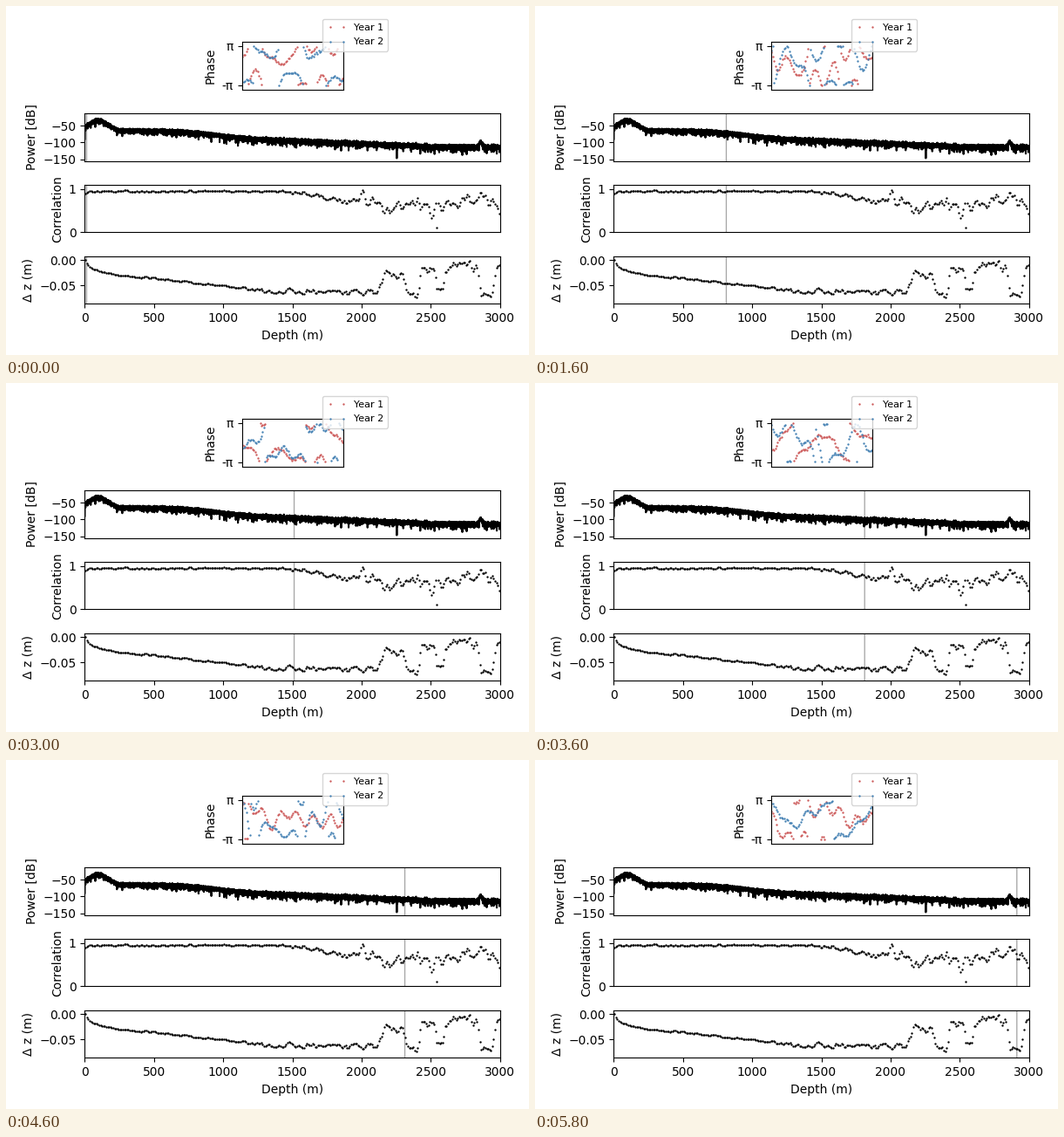
Recreate the animation shown at these times as a matplotlib script. Size 600 by 400 pixels, loop 6000 ms.

```python
import numpy as np
import matplotlib.pyplot as plt
from matplotlib.animation import FuncAnimation

W, H, FRAMES = 600, 400, 30
TOP, PITCH, ROW = 41.05, 81.9, 54.6
rng = np.random.default_rng(12)
plt.rcParams.update({"font.family": "DejaVu Sans", "font.size": 10})
fig = plt.figure(figsize=(W / 100, H / 100), dpi=100, facecolor="white")


def panel(row, x, w, label, xlim, ylim, ticks):
    bottom = H - TOP - row * PITCH - ROW
    ax = fig.add_axes([x / W, bottom / H, w / W, ROW / H])
    ax.set(xlim=xlim, ylim=ylim, xticks=[], yticks=ticks, ylabel=label)
    return ax


def depth_panel(row, label, ylim, ticks):
    return panel(row, 90.4, 476.2, label, (0, 3000), ylim, ticks)


def curve(x, *points):
    return np.interp(x, *zip(*points))


def ramp(x, start, end):
    t = np.clip((x - start) / (end - start), 0, 1)
    return t * t * (3 - 2 * t)


def bump(x, center, width, power=2):
    return np.exp(-np.abs((x - center) / width) ** power)


def wavy(n):
    """Noise with some correlation between neighbours, unit spread."""
    return np.convolve(rng.normal(size=n + 2), [0.45, 0.77, 0.45], "valid")


def dots(ax, x, y, color):
    return ax.plot(x, y, "o", ms=1.7, mew=0, color=color)[0]


phase_ax = panel(0, 270.6, 116.2, "Phase", (0, 1), (-3.83, 3.83),
                 [-np.pi, np.pi])
phase_ax.set_yticklabels(["-π", "π"])
power_ax = depth_panel(1, "Power [dB]", (-155, -13), [-150, -100, -50])
corr_ax = depth_panel(2, "Correlation", (0, 1.1), [0, 1])
dz_ax = depth_panel(3, "Δ z (m)", (-0.0865, 0.0077), [-0.05, 0])
dz_ax.set_xticks(range(0, 3001, 500))
dz_ax.set_xlabel("Depth (m)")

# Power: falling level, speckle with a long lower tail
fine = np.linspace(0, 3000, 7000)
level = curve(fine, (0, -54), (80, -34), (130, -38), (240, -65), (700, -68),
              (1200, -90), (2000, -104), (2500, -113), (3000, -115))
level += 14 * bump(fine, 2862, 16)
spread = 0.36 + 0.12 * ramp(fine, 500, 1800)
noise = rng.normal(size=(2, fine.size)) * spread
echo = np.hypot(1 + noise[0], noise[1])
power = level + np.maximum(20 * np.log10(echo), -23) + rng.normal(0, 1.5, fine.size)
power[0] = -90
power[np.searchsorted(fine, 2255)] = -147
power_ax.plot(fine, power, color="k", lw=1.5)

# Correlation: steady, then falling and scattered
depth = np.arange(5, 3000, 10)
deep = ramp(depth, 1400, 2050)
corr = 0.95 - 0.07 * np.exp(-depth / 20) - 0.29 * deep
corr += curve(depth, (2080, 0), (2200, -0.14), (2300, 0), (2400, 0.07),
              (2510, -0.13), (2640, 0.06), (2850, 0.21), (3000, -0.17))
corr += wavy(depth.size) * (0.011 + 0.064 * deep)
corr = np.minimum(corr, 0.97)
corr[254] = 0.1
dots(corr_ax, depth, corr, "k")

# Displacement: sinking, then flipping between two levels
dz = -0.022 * (1 - np.exp(-depth / 50)) - 0.041 * np.minimum(depth / 1400, 1)
dz += ramp(depth, 2105, 2180) * (0.038 + 0.016 * ramp(depth, 2300, 2700))
for center, width, depth_of_dip in ((2250, 18, 0.012), (2370, 52, 0.046),
                                    (2568, 32, 0.042), (2905, 62, 0.058)):
    dz -= depth_of_dip * bump(depth, center, width, 6)
dz += wavy(depth.size) * (0.0009 + 0.0024 * ramp(depth, 1000, 1600)
                          + 0.002 * ramp(depth, 2000, 2300))
dots(dz_ax, depth, np.clip(dz, -0.08, 0.004), "k")

cursors = [ax.axvline(13, color="0.65", lw=0.95, zorder=1, snap=False)
           for ax in (power_ax, corr_ax, dz_ax)]

# Phase window
pos = np.linspace(0.005, 0.995, 80)
year1 = dots(phase_ax, pos, pos, "indianred")
year2 = dots(phase_ax, pos, pos, "steelblue")
phase_ax.legend([year1, year2], ["Year 1", "Year 2"], numpoints=2, fontsize=8,
                loc="upper left", borderaxespad=0, borderpad=0.47,
                labelspacing=0.58, handletextpad=0.77,
                bbox_to_anchor=(363 / W, 1 - 14.8 / H),
                bbox_transform=fig.transFigure)


def phase(gen):
    """Drifting sum of waves, wrapped to one turn."""
    y = gen.uniform(-np.pi, np.pi) + gen.normal(0, 4) * pos
    for cycles in (1, 2, 3, 4.5, 6):
        start = gen.uniform(0, 2 * np.pi)
        y += gen.normal(0, 1.8 / cycles ** 0.6) * np.sin(2 * np.pi * cycles * pos + start)
    y += gen.normal(0, 0.1, pos.size)
    return (y + np.pi) % (2 * np.pi) - np.pi


def update(i):
    gen = np.random.default_rng(100 + i)
    for line in (year1, year2):
        line.set_ydata(phase(gen))
    for cursor in cursors:
        cursor.set_xdata([100 * i + 13] * 2)
    return [year1, year2, *cursors]


anim = FuncAnimation(fig, update, frames=FRAMES, interval=200, repeat=True,
                     repeat_delay=0, blit=False)
plt.show()
```
